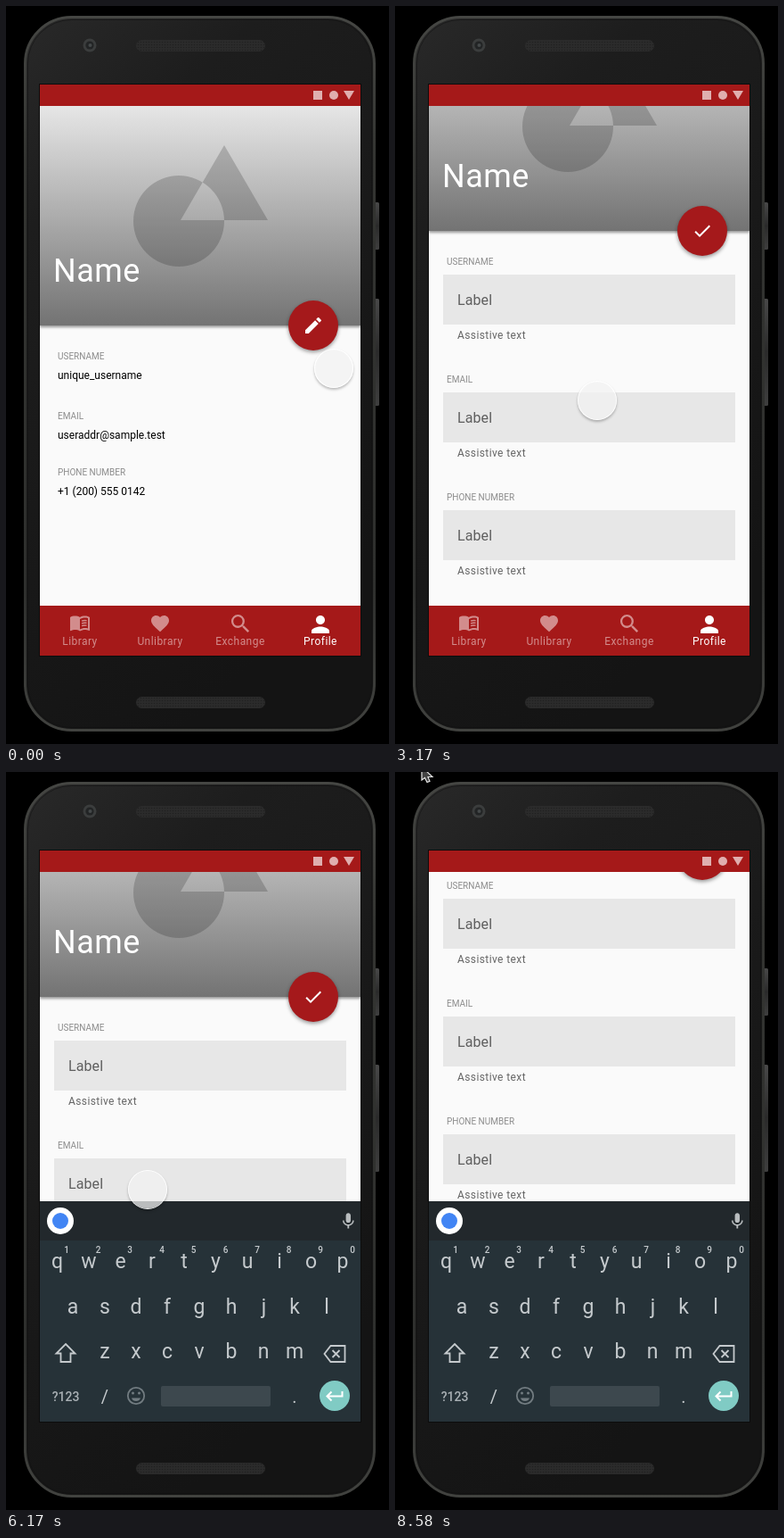
Write an HTML page that moves like this. It is 430 by 827 pixels and loops after 8.83 s.

```html
<!DOCTYPE html>
<html lang="en">
<head>
<meta charset="utf-8">
<title>Profile edit</title>
<style>
  html, body { margin: 0; width: 100%; height: 100%; overflow: hidden; background: #000; }
  #stage { position: absolute; left: 0; top: 0; width: 430px; height: 827px; overflow: hidden; }
  svg { display: block; font-family: Roboto, sans-serif; }
  .scroll, .view, .edit, .keyboard, .pointer, .touch { animation: 8830ms step-end infinite; }

  .name { font-size: 36px; letter-spacing: .5px; fill: #fff; }
  .caption { font-size: 10px; fill: #8c8c8c; }
  .value { font-size: 12px; fill: #000; }
  .label { font-size: 16px; letter-spacing: .1px; fill: #5f5f5f; }
  .assist { font-size: 12px; letter-spacing: .4px; fill: #666; }
  .nav { font-size: 12px; letter-spacing: .45px; text-anchor: middle; fill: #fff; }
  .dim { opacity: .5; }
  .keys { font-size: 23px; text-anchor: middle; fill: #c5cacd; }
  .keys .hint { font-size: 10px; font-weight: 500; }
  .keys .mode { font-size: 14px; font-weight: 500; fill: #aab1b5; }
  .fab { filter: drop-shadow(0 2px 2px rgba(0, 0, 0, .4)); }
  .header { filter: drop-shadow(0 2px 1.5px rgba(0, 0, 0, .4)); }

  .touch {
    position: absolute; left: -22px; top: -22px; width: 44px; height: 44px;
    box-sizing: border-box; border-radius: 50%;
    border: 1.5px solid rgba(255, 255, 255, .92);
    background: rgba(242, 242, 242, .74); background-clip: padding-box;
    box-shadow: 0 2px 3px rgba(0, 0, 0, .26);
    animation-name: touch;
  }
  .scroll { animation-name: scroll; }
  .view { animation-name: view; }
  .edit { animation-name: edit; }
  .keyboard { animation-name: keyboard; }
  .pointer { animation-name: pointer; }

  @keyframes touch {
    0% { transform: translate(368px, 406px); }
    .4% { transform: translate(368px, 406px); animation-timing-function: ease-in-out; }
    7.58% { transform: translate(345px, 361px); }
    13.25% { transform: translate(345px, 361px); animation-timing-function: ease-in-out; }
    19.81% { transform: translate(265px, 426px); }
    20.84% { transform: translate(265px, 426px); animation-timing-function: linear; }
    22.65% { transform: translate(261px, 429px); }
    35.9% { transform: translate(227px, 442px); animation-timing-function: ease-in-out; }
    44.39% { transform: translate(238px, 198px); }
    45.3% { transform: translate(238px, 198px); animation-timing-function: ease-in-out; }
    55.71% { transform: translate(139px, 455px); }
    56.62% { transform: translate(139px, 453px); }
    66.02% { transform: translate(142px, 458px); }
    69.87% { transform: translate(159px, 468px); }
    75.53% { transform: translate(158px, 455px); }
    80.18% { transform: translate(156px, 466px); }
    84.03% { transform: translate(171px, 438px); opacity: 1; }
    87.77% { transform: translate(171px, 438px); opacity: 1; animation-timing-function: ease-in-out; }
    96.25% { transform: translate(33px, 14px); opacity: 1; }
    96.26%, 100% { transform: translate(33px, 14px); opacity: 0; }
  }
  @keyframes pointer { 0% { opacity: 0; } 96.26%, 100% { opacity: 1; } }
  @keyframes scroll {
    0% { transform: translateY(0); }
    35.9% { transform: translateY(-106px); }
    80.18%, 100% { transform: translateY(-265px); }
  }
  @keyframes view {
    0% { opacity: 1; }
    9.4% { opacity: 1; animation-timing-function: steps(3, start); }
    12.23%, 100% { opacity: 0; }
  }
  @keyframes edit {
    0% { opacity: 0; }
    9.4% { opacity: 0; animation-timing-function: steps(3, start); }
    12.23%, 100% { opacity: 1; }
  }
  @keyframes keyboard {
    0%, 62.28%, 75.53% { opacity: 0; }
    55.71%, 69.87%, 85.84%, 100% { opacity: 1; }
  }
</style>
</head>
<body>
<div id="stage">
<svg width="430" height="827" viewBox="0 0 430 827">
  <defs>
    <linearGradient id="body" x1="0" y1="0" x2=".45" y2="1">
      <stop offset="0" stop-color="#292929"/>
      <stop offset=".25" stop-color="#1d1d1d"/>
      <stop offset="1" stop-color="#141414"/>
    </linearGradient>
    <linearGradient id="rim" x1="0" y1="0" x2="0" y2="1">
      <stop offset="0" stop-color="#454643"/>
      <stop offset=".2" stop-color="#333431"/>
      <stop offset=".8" stop-color="#2e2f2d"/>
      <stop offset="1" stop-color="#41423f"/>
    </linearGradient>
    <linearGradient id="side" x1="0" y1="0" x2="0" y2="1">
      <stop offset="0" stop-color="#484848"/>
      <stop offset=".5" stop-color="#2b2b2b"/>
      <stop offset="1" stop-color="#3f3f3f"/>
    </linearGradient>
    <linearGradient id="cover" x1="0" y1="0" x2="0" y2="1">
      <stop offset="0" stop-color="#e6e6e6"/>
      <stop offset="1" stop-color="#737373"/>
    </linearGradient>
    <pattern id="mesh" width="3" height="3" patternUnits="userSpaceOnUse">
      <rect width="3" height="3" fill="#2b2b2b"/>
      <circle cx="1.5" cy="1.5" r=".8" fill="#202020"/>
    </pattern>
    <clipPath id="page"><rect x="38" y="112" width="360" height="560"/></clipPath>
    <g id="field">
      <rect x="54" y="407" width="328" height="56" fill="#e7e7e7"/>
      <text class="label" x="70" y="440.5">Label</text>
      <text class="assist" x="70" y="479">Assistive text</text>
    </g>
  </defs>

  <!-- phone -->
  <rect x="413" y="220" width="6" height="53" rx="1.5" fill="url(#side)"/>
  <rect x="413" y="328" width="6" height="120" rx="1.5" fill="url(#side)"/>
  <rect x="21.5" y="12.5" width="392" height="799" rx="52" fill="url(#body)" stroke="url(#rim)" stroke-width="3"/>
  <rect x="24.5" y="15.5" width="386" height="793" rx="49" fill="none" stroke="#111" stroke-opacity=".5"/>
  <rect x="146" y="38" width="145" height="13" rx="6.5" fill="url(#mesh)"/>
  <rect x="146" y="774" width="145" height="13" rx="6.5" fill="url(#mesh)"/>
  <circle cx="94" cy="44" r="7.5" fill="#3b3d3d"/>
  <circle cx="94" cy="44" r="4.6" fill="#222425"/>
  <circle cx="94.5" cy="44" r="2" fill="#444849"/>
  <rect x="37" y="87" width="362" height="642" fill="#0c0c0c"/>

  <!-- page -->
  <rect x="38" y="112" width="360" height="560" fill="#fafafa"/>
  <g clip-path="url(#page)">
    <g class="scroll">
      <g class="header"><rect x="38" y="112" width="360" height="246" fill="url(#cover)"/></g>
      <path d="M245 156L294 240H196ZM143 241a51 51 0 0 1 102 0a51 51 0 0 1 -102 0Z" fill-rule="evenodd" fill="#000" fill-opacity=".18"/>
      <text class="name" x="53" y="309">Name</text>
      <text class="caption" x="58" y="395.5">USERNAME</text>
      <g class="view">
        <text class="value" x="58" y="418">unique_username</text>
        <text class="caption" x="58" y="462.5">EMAIL</text>
        <text class="value" x="58" y="485">useraddr@sample.test</text>
        <text class="caption" x="58" y="525.5">PHONE NUMBER</text>
        <text class="value" x="58" y="548">+1 (200) 555 0142</text>
      </g>
      <g class="edit">
        <path transform="translate(46 118)" fill="#fff" d="M20 11H7.83l5.59-5.59L12 4l-8 8 8 8 1.41-1.41L7.83 13H20z"/>
        <use href="#field"/>
        <text class="caption" x="58" y="527.5">EMAIL</text>
        <use href="#field" y="132"/>
        <text class="caption" x="58" y="659.5">PHONE NUMBER</text>
        <use href="#field" y="264"/>
      </g>
      <g class="fab"><circle cx="345" cy="358" r="28" fill="#a5191b"/></g>
      <g transform="translate(333 346)" fill="#fff">
        <path class="view" d="M3 17.25V21h3.75L17.81 9.94l-3.75-3.75zM20.71 7.04a1 1 0 0 0 0-1.41l-2.34-2.34a1 1 0 0 0-1.41 0l-1.83 1.83 3.75 3.75z"/>
        <path class="edit" d="M9 16.17L4.83 12l-1.42 1.41L9 19 21 7l-1.41-1.41z"/>
      </g>
    </g>
  </g>

  <!-- status bar -->
  <rect x="38" y="88" width="360" height="24" fill="#a51919"/>
  <g fill="#fff" fill-opacity=".65">
    <rect x="345" y="95" width="10" height="10"/>
    <circle cx="368" cy="100" r="5"/>
    <path d="M379 95h12l-6 10z"/>
  </g>

  <!-- navigation -->
  <rect x="38" y="672" width="360" height="56" fill="#a51919"/>
  <g class="nav">
    <g class="dim">
      <g transform="translate(71 679)">
        <path d="M21 5c-1.11-.35-2.33-.5-3.5-.5-1.95 0-4.05.4-5.5 1.5-1.45-1.1-3.55-1.5-5.5-1.5S2.45 4.9 1 6v14.65c0 .25.25.5.5.5C3.1 20.45 5.05 20 6.5 20c1.95 0 4.05.4 5.5 1.5 1.35-.85 3.8-1.5 5.5-1.5 1.65 0 3.35.3 4.75 1.05.5.15.75-.2.75-.45V6c-.6-.45-1.25-.75-2-1zm0 13.5c-1.1-.35-2.3-.5-3.5-.5-1.7 0-4.15.65-5.5 1.5V8c1.35-.85 3.8-1.5 5.5-1.5 1.2 0 2.4.15 3.5.5z"/>
        <path d="M14 10.2q2.6-1 5.6-.5M14 12.9q2.6-1 5.6-.5M14 15.6q2.6-1 5.6-.5" fill="none" stroke="#fff" stroke-width="1.4"/>
      </g>
      <path transform="translate(161 680)" d="M12 21.35l-1.45-1.32C5.4 15.36 2 12.28 2 8.5 2 5.42 4.42 3 7.5 3c1.74 0 3.41.81 4.5 2.09C13.09 3.81 14.76 3 16.5 3 19.58 3 22 5.42 22 8.5c0 3.78-3.4 6.86-8.55 11.54z"/>
      <path transform="translate(249.5 678.5) scale(1.15)" d="M15.5 14h-.79l-.28-.27A6.47 6.47 0 0 0 16 9.5 6.5 6.5 0 1 0 9.5 16c1.61 0 3.09-.59 4.23-1.57l.27.28v.79l5 4.99L20.49 19zm-6 0C7.01 14 5 11.99 5 9.5S7.01 5 9.5 5 14 7.01 14 9.5 11.99 14 9.5 14z"/>
      <text x="83" y="716">Library</text>
      <text x="173" y="716">Unlibrary</text>
      <text x="263" y="716">Exchange</text>
    </g>
    <path transform="translate(338 678) scale(1.25)" d="M12 12c2.21 0 4-1.79 4-4s-1.79-4-4-4-4 1.79-4 4 1.79 4 4 4zm0 2c-2.67 0-8 1.34-8 4v2h16v-2c0-2.66-5.33-4-8-4z"/>
    <text x="353" y="716">Profile</text>
  </g>

  <!-- keyboard -->
  <g class="keyboard">
    <rect x="38" y="481" width="360" height="247" fill="#263238"/>
    <rect x="38" y="481" width="360" height="44" fill="#22282c"/>
    <circle cx="61" cy="503" r="15" fill="#fff"/>
    <circle cx="61" cy="503" r="9" fill="#4285f4"/>
    <path transform="translate(373.5 492.5) scale(.9)" fill="#b9bdbf" d="M12 14c1.66 0 3-1.34 3-3V5c0-1.66-1.34-3-3-3S9 3.34 9 5v6c0 1.66 1.34 3 3 3zm5.3-3c0 3-2.54 5.1-5.3 5.1S6.7 14 6.7 11H5c0 3.41 2.72 6.23 6 6.72V21h2v-3.28c3.28-.48 6-3.3 6-6.72z"/>
    <g class="keys">
      <text x="57.5 93 128.5 164 200 235.5 271 307 342.5 378" y="556">qwertyuiop</text>
      <text class="hint" x="68 103.5 139 175 210.5 246.5 282 317.5 353 389" y="539">1234567890</text>
      <text x="75 111 146 181 217 253 289.5 324 360" y="607">asdfghjkl</text>
      <text x="111 146 181 217 253 289 324" y="657">zxcvbnm</text>
      <text class="mode" x="67" y="705">?123</text>
      <text x="111 324" y="707" font-size="20">/.</text>
    </g>
    <g fill="none" stroke="#c5cacd" stroke-width="1.8">
      <path d="M67 641l10.5 10.5H72.500V661h-11v-9.500H56.500z"/>
      <path d="M364.500 643H380.500V661H364.500L357.500 652zM366.500 648l8 8m0-8l-8 8"/>
    </g>
    <g fill="none" stroke="#727c81" stroke-width="1.8">
      <circle cx="146" cy="699" r="9.2"/>
      <path d="M141 701.500a5.300 5.300 0 0 0 10 0z" fill="#727c81" stroke="none"/>
    </g>
    <g fill="#727c81"><circle cx="142.500" cy="696" r="1.5"/><circle cx="149.500" cy="696" r="1.5"/></g>
    <rect x="174" y="688" width="123" height="23" rx="2" fill="#3d484e"/>
    <circle cx="369" cy="699" r="17" fill="#80cbc4"/>
    <path d="M377.500 694v5.500H361M365.500 694.500l-5 5 5 5" fill="none" stroke="#fff" stroke-width="2"/>
  </g>

  <path class="pointer" d="M30-6V9l3.500-2.500L36 11.500l3-1.200-2-4.800h5z" fill="#444" stroke="#e4e4e4" stroke-width="1.2"/>
</svg>
<div class="touch"></div>
</div>
</body>
</html>
```
